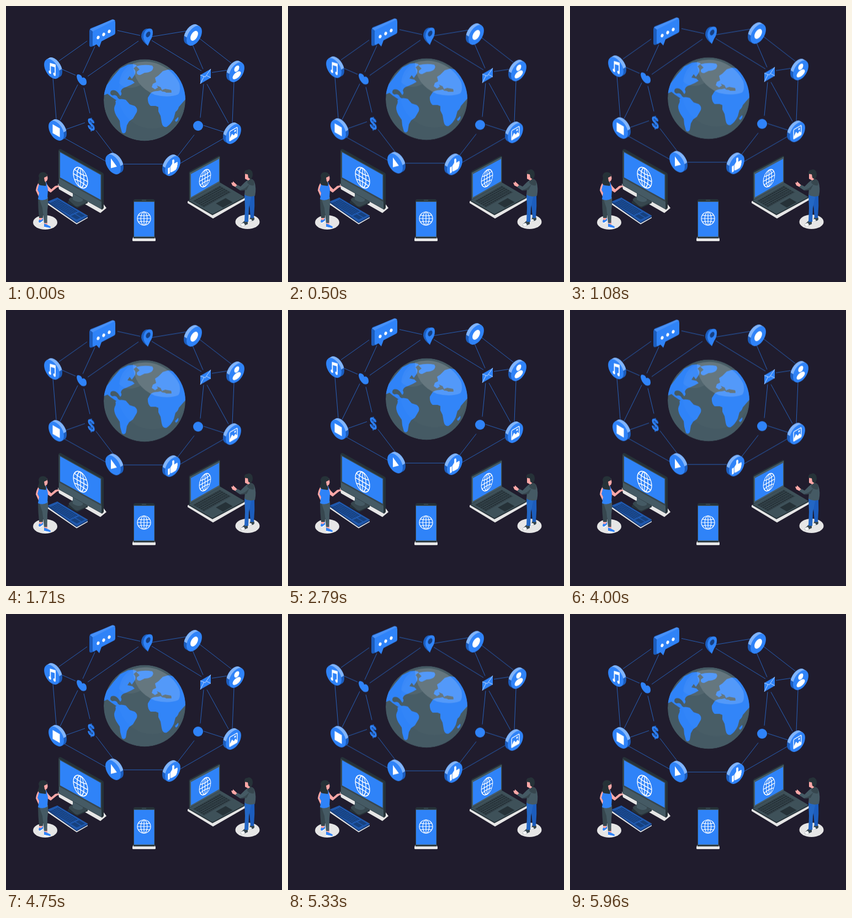
Recreate the animation shown at these times as an HTML page. Size 500 by 500 pixels, loop 6 s.

```html
<!DOCTYPE html>
<html lang="en">
<head>
<meta charset="utf-8">
<title>Connected world</title>
<style>
html, body { margin: 0; width: 100%; height: 100%; overflow: hidden; background: #201c2d; }
svg { display: block; width: 100vw; height: 100vh; }
.blue { fill: #2f83f8; }
.deep { fill: #1c5dbd; }
.pale { fill: #82b5fb; }
.slate { fill: #455a64; }
.iron { fill: #37474f; }
.ink { fill: #263238; }
.skin { fill: #ffa8a7; }
.plate { fill: #e6e6e6; }
.white { fill: #fff; }
.wire { stroke: #2b70d5; stroke-width: .85; fill: none; }
.web { stroke: #fff; stroke-width: 1.2; fill: none; }
.dollar { font: bold 30px "Liberation Sans", Arial, sans-serif; text-anchor: middle; }
</style>
</head>
<body>
<svg viewBox="0 0 500 500" xmlns="http://www.w3.org/2000/svg">
<defs>
  <clipPath id="ball"><circle cx="251" cy="170.5" r="74"/></clipPath>
  <g id="web" class="web">
    <circle r="12"/><ellipse rx="5.8" ry="12"/>
    <path d="M0-12V12M-12 0H12M-10-6.2Q0-3.8 10-6.2M-10 6.2Q0 3.8 10 6.2"/>
  </g>
</defs>

<g id="cloud">
  <path id="wires" class="wire" transform="translate(0 -.6)"/>

  <g clip-path="url(#ball)">
    <circle class="slate" cx="251" cy="170.5" r="74"/>
    <g class="blue">
      <path d="M176 162L182 144L194 128L207 113L221 106Q233 104 237 108L231 113Q237 118 233 125L228 132L224 127L220 133L229 135L233 139L226 143L217 147Q209 149 208 155Q211 160 207 163L203 157Q196 150 190 154Q187 160 193 162Q200 160 203 167L209 171L202 172L190 164L184 159Z"/>
      <path d="M198 172Q207 166 217 170L224 178L233 181Q239 185 237 192L230 204L223 209L219 216L217 228Q214 233 210 229L207 218L206 208L200 199Q194 188 197 181Q200 176 198 172Z"/>
      <path d="M236 109Q251 105 265 108Q269 113 263 118Q258 121 251 121L243 125Q236 125 237 119L242 115Z"/>
      <path d="M264 147L266 141L272 138L270 130L276 126L284 118L294 115L306 117L325 140L327 167L319 176L313 183Q312 188 307 192L304 203Q299 214 291 219Q284 221 282 211L280 199L276 191V183L271 181L262 181Q256 176 257 166L262 158Q266 154 275 154L284 152L290 157L300 157L299 154L290 154L286 151L282 152L276 147L270 151Z"/>
      <path d="M306 207L312 201Q314 206 308 210Z"/>
    </g>
    <path class="slate" d="M273 144l7 3 3 6 5-3 11 2 1 3-9 1-8-1-6-5z"/>
    <circle cx="265" cy="160" r="62" fill="#fff" opacity=".015"/>
    <path d="M230 104A70 70 0 0 1 314 140Q317 154 312 160Q295 167 270 161Q231 145 230 104Z" fill="#fff" opacity=".16"/>
    <path d="M205 140Q208 113 231 104Q230 126 244 143Q220 155 205 140Z" fill="#fff" opacity=".05"/>
  </g>

  <g id="bubble">
    <path class="deep" d="M151 45Q151 42 154 40L193 25L197 27L160 72L154 74Q151 74 151 71Z"/>
    <path fill="#4791f9" d="M152 42L192 24.5Q196 23.5 198 27L158 47Z"/>
    <path class="blue" d="M157 49Q157 46 160 44.500L194 27.500Q198 26 198 30V48Q198 51 195 52.500L173 64L169 75L164 69.500L160 71.500Q157 73 157 70Z"/>
    <g class="white">
      <ellipse cx="167" cy="57" rx="2.500" ry="3.300" transform="rotate(20 167 57)"/>
      <ellipse cx="177" cy="51.500" rx="2.500" ry="3.300" transform="rotate(20 177 51.500)"/>
      <ellipse cx="187" cy="46" rx="2.500" ry="3.300" transform="rotate(20 187 46)"/>
    </g>
  </g>

  <g id="pin">
    <path class="deep" d="M245 56Q245 44 254 41L262 41L257 72Q246 64 245 56Z"/>
    <path class="blue" d="M249 57Q249 45 258 41Q266 39 266 48Q266 56 261 63L257 72Q250 64 249 57Z"/>
    <path d="M253.500 54Q254.500 58 258 56Q262 53 261.500 48.500Q260.500 45 257 47Q253 50 253.500 54Z" fill="#173f80"/>
  </g>

  <g id="mail">
    <path class="blue" d="M352 125L371 114V130L352 141Z"/>
    <path d="M352 125L361 128.500L371 114M352 141L358.500 128M371 130L363.500 126" stroke="#d4e5ff" stroke-width=".9" fill="none"/>
  </g>

  <path class="blue" d="M128 128Q128 123 132 124Q137 125 138 130Q142 128 145 133Q147 138 145 142Q142 145 137 143Q129 137 128 128Z"/>

  <g class="dollar" transform="matrix(.74 .4 0 1 154 215)">
    <text class="deep" x="1.500" y="9">$</text>
    <text class="blue" y="10">$</text>
  </g>

  <circle class="blue" cx="348" cy="217" r="9"/>
  <g id="coins"></g>
</g>

<g id="desktop">
  <path class="plate" d="M94 322L176 358L182 366L171 375L96 332Z"/>
  <path class="ink" d="M112 354L129 344L148 354V357L129 366L112 357Z"/>
  <path class="iron" d="M114 352Q113 350 116 348L124 343L147 353Q148 355 146 356L131 363Q128 364 125 362Z"/>
  <path class="slate" d="M121 337L139 346V353Q132 358 121 351Z"/>
  <path class="ink" d="M95 262Q95 259 99 259L175 302Q177 303 177 306V366L174 369L97 326Q95 325 95 322Z"/>
  <path class="slate" d="M96 312L173 354V368L97 325.500Q96 324 96 322Z"/>
  <path class="iron" d="M95.500 262L173 305V355L95.500 312Z"/>
  <path class="blue" d="M98 265L171.500 306V351L98 310.500Z"/>
  <use href="#web" transform="matrix(1.08 .61 0 1.44 135 311)"/>
</g>

<g id="keyboard">
  <path class="plate" d="M76 355L93 348L148 380V384L128 395.500L76 360Z"/>
  <path fill="#193f7d" d="M76 354L93 347L148 380V382.500L128 393.500L76 357Z"/>
  <path fill="#1f58ad" d="M76 354L93 347L148 380L128 391.500Z"/>
  <g id="deskKeys" fill="#15396f" transform="matrix(.55 .33 -.18 .085 93 348)"></g>
</g>

<g id="laptop">
  <path class="plate" d="M329 354L388 321L434 348V351L375 385L329 357Z"/>
  <path class="ink" d="M331 352L388 320L432 346V348L374 379L331 354Z"/>
  <path fill="#3e5159" d="M331 352L388 320L432 346L374 377Z"/>
  <g transform="matrix(-.57 .32 .44 .26 388 321)">
    <path class="iron" d="M7 8H94V55H7Z"/>
    <g id="lapKeys" class="ink"></g>
    <path class="ink" d="M32 64H63V93H32Z"/>
  </g>
  <path class="ink" d="M331.500 302Q331.500 300 334 298.500L385 271.500Q388 271 388 274V320L333 351L331.500 350Z"/>
  <path class="slate" d="M333 302L387 273V320.500L333 350.500Z"/>
  <path class="blue" d="M335 304.500L386 277V317.500L335 346.500Z"/>
  <use href="#web" transform="matrix(.86 -.47 0 1.23 360.500 312)"/>
</g>

<g id="phone">
  <path class="plate" d="M231 418H269L271 422V425Q271 426 269 426H231Q229 426 229 425V422Z"/>
  <path class="ink" d="M233 350H267L269.500 352V421H231V352Z"/>
  <path class="slate" d="M231.500 354H269V419H231.500Z"/>
  <path class="blue" d="M232 355H268.500V417.500H232Z"/>
  <path class="slate" d="M246 351.500H254V352.500H246Z"/>
  <use href="#web" transform="translate(250 385)"/>
</g>

<g id="woman">
  <ellipse class="plate" cx="71" cy="392" rx="22" ry="13"/>
  <path class="skin" d="M60 380H65L66 388L60 391ZM70 388H75V396L69 398Z"/>
  <path class="blue" d="M60 387L64 388L67 384L67 389L61 393L59 391ZM69 394L74 396L80 399Q83 402 78 402L69 400Z"/>
  <path class="white" d="M59 391L61 393L67 389V390.500L61 394.500ZM69 400L79 402L78 403L69 401.500Z"/>
  <path class="iron" d="M58 348L69 349L67 384L60 384Q58 366 58 348Z"/>
  <path class="slate" d="M60 348L76 346Q77 358 75 370L74.500 393H69L66 366Z"/>
  <path class="skin" d="M59 320Q55 326 54 334L59 345L62 343L58 334L63 324ZM73 321Q77 328 82 332L89 326L94 325L97 327L92 329L87 333L81 338Q75 335 71 328ZM65 316L72 315L73 323L64 323Z"/>
  <path class="blue" d="M60 322L65 319Q70 323 73 319L76 332L75 349Q66 354 58 350L60 338L57 333Z"/>
  <path class="skin" d="M67 306L74 305Q77 312 74 317L68 318Z"/>
  <path class="ink" d="M75 308Q74 301 67 301Q60 301 59 308Q61 313 58 318Q58 325 64 325L72 326Q74 321 70 317L69 311Z"/>
</g>

<g id="man">
  <ellipse class="plate" cx="437.500" cy="391" rx="22" ry="13"/>
  <path class="iron" d="M432 389H438V395Q433 397 430 399Q424 399 425 396ZM443 381L449 382Q451 386 449 388Q445 391 441 388Z"/>
  <path class="white" d="M425 396Q428 393 431 393L433 397L430 399Q425 399 425 396ZM440 387L444 386L446 389.500L441 389Z"/>
  <path class="deep" d="M438 339H450Q451 362 449 384L443 384L441 360Z"/>
  <path fill="#2367c5" d="M432 340L445 342L440 366L439 391H432L433 366Z"/>
  <path class="skin" d="M419 325L415 321L411 317.500L411 320L408 320L410 325L416 328Z"/>
  <path class="slate" d="M438 315Q446 311 450 318Q454 330 451 344Q440 347 432 342L433 331L424 334L415 328L419 324L425 327L433 319Z"/>
  <path class="iron" d="M438 315Q446 311 450 318L449 325Q441 326 437 320ZM433 330L441 323L436 333L424 335Z"/>
  <path class="skin" d="M433 303L440 303L443 313L439 316L433 313Z"/>
  <path class="ink" d="M432 304Q431 297 437 297Q442 294 446 300Q449 309 443 314L439 311L438 305Z"/>
</g>
</svg>

<script>
const byId = id => document.getElementById(id);

// Each wire: x1 y1 x2 y2
const wires = [
  "202 45 243 54", "147 64 96 100", "161 74 139 122", "265 56 326 46",
  "240 64 148 128", "264 63 354 118", "338 71 357 115", "350 59 408 104",
  "101 115 126 126", "85 131 91 205", "130 143 98 208", "141 149 152 195",
  "109 224 143 212", "106 240 181 282", "163 226 195 268", "213 287 284 287",
  "310 274 341 234", "315 286 395 240", "358 217 395 229", "352 203 358 142",
  "364 142 403 213", "373 121 400 117", "413 138 410 212"
];
byId("wires").setAttribute("d", wires.map(w => "M" + w).join(""));

const icons = {
  note: `<path class="white" d="M-4-9L8-12V7H6V-6L-2-4V8H-4Z"/>
    <ellipse class="white" cx="-4" cy="8" rx="2.500" ry="2.700"/><ellipse class="white" cx="5.500" cy="7" rx="2.500" ry="2.700"/>`,
  square: `<rect class="white" x="-7.500" y="-8" width="15" height="16"/>`,
  dot: `<circle class="white" r="8"/>`,
  play: `<path class="white" d="M-4.600-8.700L8 0L-4.600 9Z"/>`,
  user: `<circle class="white" cy="-6.500" r="5.200"/><ellipse class="white" cy="5.500" rx="8.700" ry="5.800"/>`,
  photo: `<rect x="-8" y="-8.500" width="16" height="17" rx="1.500" fill="none" stroke="#fff" stroke-width="1.500"/>
    <path class="white" d="M-8 5L-3-2L1 3L4 0L8 5V8H-8Z"/><circle class="white" cx="3.500" cy="-4" r="1.700"/>`,
  thumb: `<path class="white" d="M-10-1H-6V10H-10ZM-5-1L-1-5V-11Q3-13 3.500-8L3-3H9Q11-2 10 0Q11 2 9.500 3.500Q10 6 8.500 7Q8 10 6 10H-1L-5 9Z"/>`
};

// A tilted coin; side 1 faces left, -1 faces right
function coin([x, y, side, icon]) {
  const r = 16.1, d = 5.8, a = r * Math.SQRT1_2;
  const ex = r * Math.cos(-.3), ey = r * Math.sin(-.3);
  return `<g transform="translate(${x} ${y})">
    <g transform="matrix(${side * .866} .5 0 1 0 0)">
      <path class="deep" d="M${-a} ${-a}l${d} ${-d}A${r} ${r} 0 0 1 ${a + d} ${a - d}L${a} ${a}Z"/>
      <path class="pale" d="M${-a} ${-a}l${d} ${-d}A${r} ${r} 0 0 1 ${ex + d} ${ey - d}L${ex} ${ey}Z"/>
      <circle class="blue" r="${r}"/>
    </g>
    <g transform="matrix(.866 ${side * .5} 0 1 0 0)">${icons[icon]}</g>
  </g>`;
}
byId("coins").innerHTML = [
  [83, 114, 1, "note"], [91, 226, 1, "square"], [194, 287, 1, "play"],
  [341, 54, -1, "dot"], [418, 120, -1, "user"], [412, 232, -1, "photo"], [302, 290, -1, "thumb"]
].map(coin).join("");

// Rows of keys inside a box of a 100 x 100 plane
function keys(id, x, y, w, h, cols, rows) {
  const dx = w / cols, dy = h / rows;
  let d = "";
  for (let r = 0; r < rows; r++)
    for (let c = 0; c < cols; c++)
      d += `M${x + c * dx} ${y + r * dy}h${dx * .78}v${dy * .72}h${-dx * .78}z`;
  byId(id).innerHTML = `<path d="${d}"/>`;
}
keys("deskKeys", 5, 10, 66, 82, 14, 5);
byId("deskKeys").innerHTML += `<path d="M75 10h19v34h-19zM75 54h19v38h-19z" opacity=".75"/>`;
keys("lapKeys", 9, 10, 84, 44, 14, 5);

// Steady rise and fall at 24 pictures a second
byId("cloud").animate([
  { transform: "translateY(0px)", easing: "steps(72)" },
  { transform: "translateY(-10px)", easing: "steps(72)" },
  { transform: "translateY(0px)" }
], { duration: 6000, iterations: Infinity });
</script>
</body>
</html>
```
